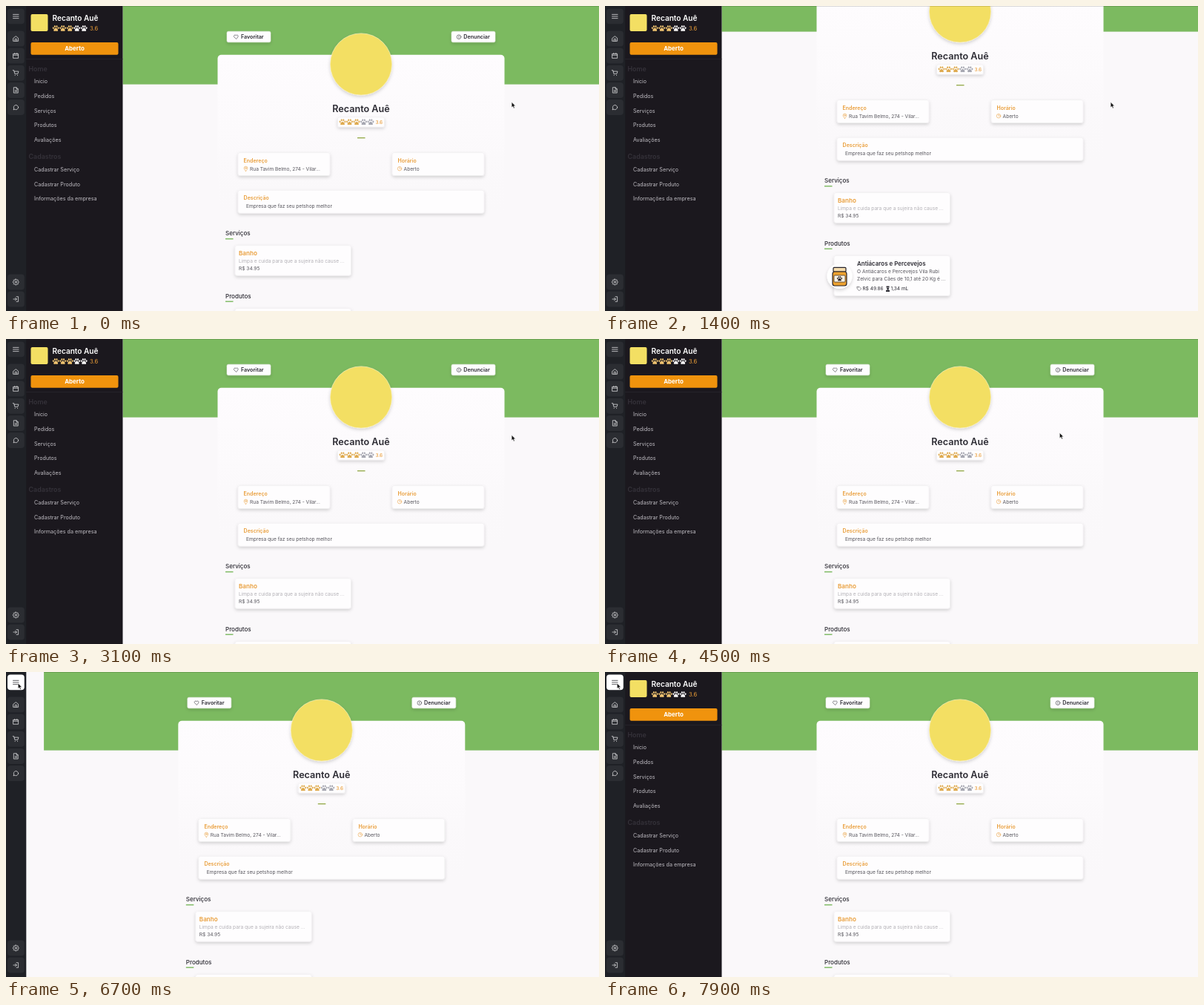
These frames come from a looping animation (800 by 411 pixels, 8 s). An HTML page:

```html
<!DOCTYPE html>
<html lang="pt-BR">
<head>
<meta charset="utf-8">
<title>Painel do petshop</title>
<style>
  html, body { margin: 0; width: 100%; height: 100%; overflow: hidden; background: #faf8fa; }
  svg { display: block; width: 100vw; height: 100vh; font-family: Inter, "Open Sans", sans-serif; }
  .line { fill: none; stroke-width: 2; stroke-linecap: round; stroke-linejoin: round; }
</style>
</head>
<body>
<svg id="stage" viewBox="0 0 800 411" preserveAspectRatio="none">
  <defs>
    <linearGradient id="fade" x1="0" y1="0" x2="0" y2="1">
      <stop offset="0" stop-color="#fefcfe"/>
      <stop offset=".45" stop-color="#fcfafc"/>
      <stop offset="1" stop-color="#faf8fa" stop-opacity="0"/>
    </linearGradient>
    <filter id="shadow" x="-20%" y="-40%" width="140%" height="200%">
      <feDropShadow dx="0" dy="2" stdDeviation="2" flood-color="#000" flood-opacity=".17"/>
    </filter>
    <g id="paw">
      <ellipse cx="-3.4" cy="-.5" rx="1" ry="1.4" transform="rotate(-20 -3.4 -.5)"/>
      <ellipse cx="-1.3" cy="-2.7" rx="1" ry="1.5"/>
      <ellipse cx="1.3" cy="-2.7" rx="1" ry="1.5"/>
      <ellipse cx="3.4" cy="-.5" rx="1" ry="1.4" transform="rotate(20 3.4 -.5)"/>
      <path d="M0-.6C1.4-.6 3.1 1.4 2.9 2.8 2.7 4.2 1 3.5 0 3.5S-2.7 4.2-2.9 2.8C-3.1 1.4-1.4-.6 0-.6Z"/>
    </g>
  </defs>
  <rect width="800" height="411" fill="#faf8fa"/>
  <g id="page">
    <rect id="banner" y="-1" height="106.6" fill="#7cba60"/>
    <g id="content"></g>
  </g>
  <rect id="topline" y="0" height="1" fill="#000" opacity=".14"/>
  <g id="sidebar"></g>
  <g id="rail"></g>
  <path id="cursor" d="M0 0V7.4L1.7 5.9 2.9 8.5 4.2 7.9 3 5.4H5.3Z" fill="#111" stroke="#fff" stroke-width=".6"/>
</svg>
<script>
const LOOP = 8000, STEP = 100;
const OPEN_X = 157.5, CLOSED_X = 27, MAX_SCROLL = 71;
const CLOSE_AT = 6546, REOPEN_AT = 7600, SLIDE = 300, HOVER_AT = 5900;
const SHOP = "Recanto Auê";
const ORANGE = "#e99d38", GREEN = "#7cba60", INK = "#2c2b33", GREY = "#55545b";

const $ = id => document.getElementById(id);

const text = (x, y, str, size, fill, weight = 400, anchor = "start") =>
  `<text x="${x}" y="${y}" font-size="${size}" fill="${fill}" font-weight="${weight}" text-anchor="${anchor}">${str}</text>`;

const rect = (x, y, w, h, fill, r = 0, extra = "") =>
  `<rect x="${x}" y="${y}" width="${w}" height="${h}" rx="${r}" fill="${fill}" ${extra}/>`;

const panel = (x, y, w, h, r = 3) =>
  rect(x, y, w, h, "#fefdfe", r, 'filter="url(#shadow)" stroke="#eceaed" stroke-width=".5"');

// Icons are drawn on a 24-unit grid centred on (cx, cy).
const icon = (cx, cy, size, color, d, id = "") =>
  `<path ${id && `id="${id}"`} class="line" stroke="${color}" d="${d}"
    transform="translate(${cx - size / 2} ${cy - size / 2}) scale(${size / 24})"/>`;

const paws = (x, y, on, off) => [0, 1, 2, 3, 4].map(i =>
  `<use href="#paw" x="${x + i * 9.5}" y="${y}" fill="${i < 3 ? on : off}"/>`).join("");

// Eight teeth: the radius alternates in pairs around the circle.
function gearPath() {
  const points = Array.from({ length: 32 }, (_, i) => {
    const angle = (i - .5) * Math.PI / 16, r = i % 4 < 2 ? 11 : 8.4;
    return `${(12 + r * Math.sin(angle)).toFixed(2)} ${(12 - r * Math.cos(angle)).toFixed(2)}`;
  });
  return `M${points.join("L")}ZM15.2 12A3.2 3.2 0 1 1 8.8 12 3.2 3.2 0 0 1 15.2 12Z`;
}

const ICONS = {
  menu: "M2 5H22M2 12H22M2 19H22",
  home: "M3 10L12 3 21 10V21H3ZM9 21V13H15V21",
  calendar: "M3 5H21V21H3ZM3 10H21M8 2V6M16 2V6",
  cart: "M1 2H5L8 15H19L22 6H6M9 20V21M18 20V21",
  doc: "M5 2H14L20 8V22H5ZM14 2V8H20M9 13H16M9 17H16",
  chat: "M21 11.5A8.5 8.5 0 0 1 8 19L3 21 5 16A8.5 8.5 0 1 1 21 11.5Z",
  gear: gearPath(),
  exit: "M14 3H21V21H14M3 12H15M10 7L15 12 10 17",
  heart: "M12 21L3 12A5.5 5.5 0 0 1 12 5 5.5 5.5 0 0 1 21 12Z",
  alert: "M22 12A10 10 0 1 1 2 12 10 10 0 0 1 22 12ZM12 7V13M12 16V17",
  clock: "M22 12A10 10 0 1 1 2 12 10 10 0 0 1 22 12ZM12 6V12H16",
  pin: "M12 23C7 17 4 14 4 9.5A8 8 0 0 1 20 9.5C20 14 17 17 12 23ZM15 9.5A3 3 0 1 1 9 9.5 3 3 0 0 1 15 9.5Z",
  tag: "M2 2H12L22 12 12 22 2 12ZM7 7V7.1"
};

const heading = (y, label) =>
  text(296, y, label, 8.05, INK, 500) + rect(296, y + 3.9, 10.5, 1.4, GREEN);

const infoCard = (x, y, w, title, body, bodyX) =>
  panel(x, y, w, 31) +
  text(x + 7.6, y + 13, title, 7, ORANGE, 600) +
  text(bodyX, y + 24.2, body, 6.6, GREY);

const pillButton = (x, label, shape, iconX, labelX) =>
  panel(x, 34.2, 59, 14.6, 2) +
  icon(iconX, 41.7, 6.8, INK, ICONS[shape]) +
  text(labelX, 44.3, label, 7.15, INK, 600);

const jar =
  `<g stroke="#26222a" stroke-width="1.2">` +
  rect(308, 423.4, 17, 5.6, "#f4dcae", 1) + rect(307, 429, 19, 19, "#eda22f", 3) +
  rect(309, 434, 15, 9, "#fbf3e2", 1, 'stroke-width=".7"') +
  `</g><use href="#paw" transform="translate(316.5 438.5) scale(.8)" fill="#26222a"/>`;

function buildContent() {
  $("content").innerHTML =
    rect(285.5, 65.8, 387, 224, "url(#fade)", 5) +
    pillButton(298, "Favoritar", "heart", 310.3, 317) +
    pillButton(601, "Denunciar", "alert", 611, 617.3) +
    `<circle cx="479" cy="78.5" r="41.6" fill="#f3df63" stroke="#f8efbb" stroke-width=".7" filter="url(#shadow)"/>` +
    text(479, 143, SHOP, 12.6, INK, 600, "middle") +
    panel(447.5, 150, 63, 13, 2) +
    paws(454, 156.5, "#dfab50", "#a6a7b1") +
    text(498.4, 158.9, "3.6", 6.5, ORANGE, 500) +
    rect(474, 177, 10.5, 1.4, "#98ad50") +
    infoCard(313, 197.6, 124, "Endereço", "Rua Tavim Belmo, 274 - Vilar...", 329) +
    icon(323.5, 219.2, 7, ORANGE, ICONS.pin) +
    infoCard(521, 197.6, 124, "Horário", "Aberto", 536.6) +
    icon(531, 219.2, 6.6, ORANGE, ICONS.clock) +
    infoCard(313, 248.2, 332, "Descrição", "Empresa que faz seu petshop melhor", 324) +
    heading(309.2, "Serviços") +
    panel(309, 322.6, 156.5, 40.6) +
    text(314, 336, "Banho", 8.1, ORANGE, 600) +
    text(314, 346.2, "Limpa e cuida para que a sujeira não cause ...", 6.6, "#b3b1b6") +
    text(314, 356, "R$ 34.95", 6.6, GREY) +
    heading(393.6, "Produtos") +
    panel(309, 407.4, 156.5, 54) +
    `<circle cx="316.5" cy="435" r="17" fill="#fff" filter="url(#shadow)"/>` + jar +
    text(340, 421.2, "Antiácaros e Percevejos", 7.95, INK, 600) +
    text(340, 431.3, "O Antiácaros e Percevejos Vila Rubi", 6.6, GREY) +
    text(340, 441, "Zelvic para Cães de 10,1 até 20 Kg é ...", 6.6, GREY) +
    icon(343, 452, 6.5, INK, ICONS.tag) +
    text(347.6, 454.4, "R$ 49.86", 6.5, INK) +
    rect(379.5, 448.5, 4, 2, INK) + rect(380.3, 451, 2.6, 2.6, INK) + rect(379, 454, 5, 2, INK) +
    text(385.5, 454.4, "1,34 mL", 6.5, INK);
}

function buildSidebar() {
  const group = (y, label, items) =>
    text(30.5, y, label, 8.9, "#35323a", 600) +
    items.map((item, i) => text(38, y + 16.4 + i * 19.8, item, 7.2, "#c0bec4")).join("");
  $("sidebar").innerHTML =
    rect(27, 0, OPEN_X - 27, 411, "#1b181e") +
    rect(33.5, 11, 23, 23, "#f3df63", 2) +
    text(62.5, 19.6, SHOP, 10.1, "#fff", 600) +
    paws(67.2, 30.2, "#edc16f", "#f5f3f4") +
    text(113, 32.9, "3.6", 7.6, ORANGE) +
    rect(33.5, 48.9, 118, 16.9, "#f0930d", 2) +
    text(92.5, 60.2, "Aberto", 7.9, "#fff", 700, "middle") +
    rect(27, 71, OPEN_X - 27, .8, "#29262d") +
    group(87.6, "Home", ["Inicio", "Pedidos", "Serviços", "Produtos", "Avaliações"]) +
    group(206.4, "Cadastros", ["Cadastrar Serviço", "Cadastrar Produto", "Informações da empresa"]);
}

function buildRail() {
  const buttons = { home: 44, calendar: 67, cart: 90.3, doc: 113.4, chat: 136.6, gear: 372, exit: 395 };
  $("rail").innerHTML =
    rect(0, 0, 27.3, 411, "#1f2126") +
    rect(2, 3.5, 22.8, 20.8, "#2b2d32", 4, 'id="menuBox"') +
    icon(13.3, 14, 9, "#e6e6e8", ICONS.menu, "menuIcon") +
    Object.entries(buttons).map(([name, y]) =>
      rect(2, y - 10.5, 22.8, 21, "#2b2d32", 4) +
      icon(13.3, y, 8.8, "#e6e6e8", ICONS[name])).join("");
}

const clamp = v => Math.max(0, Math.min(1, v));
const progress = (t, start, length) => clamp((t - start) / length);
const easeOut = p => Math.sin(p * Math.PI / 2);

// Same curve as the CSS keyword "ease".
function ease(p) {
  const bezier = (u, a, b) => 3 * u * (1 - u) ** 2 * a + 3 * u * u * (1 - u) * b + u ** 3;
  let lo = 0, hi = 1;
  for (let i = 0; i < 24; i++) {
    const mid = (lo + hi) / 2;
    if (bezier(mid, .25, .25) < p) lo = mid; else hi = mid;
  }
  return bezier(lo, .1, 1);
}

const PATH = [
  [4000, 682.1, 129.4], [4300, 668, 129], [4500, 613.3, 126.4], [4700, 440, 106],
  [4900, 259, 80], [5300, 90, 45], [5800, 25.5, 21], [6100, 16.2, 15]
];

function cursorAt(t) {
  const next = PATH.findIndex(p => p[0] > t);
  if (next === 0) return PATH[0].slice(1);
  if (next < 0) return PATH[PATH.length - 1].slice(1);
  const a = PATH[next - 1], b = PATH[next];
  const k = (t - a[0]) / (b[0] - a[0]);
  return [a[1] + (b[1] - a[1]) * k, a[2] + (b[2] - a[2]) * k];
}

function render(t) {
  const down = easeOut(progress(t, 950, 450));
  const up = easeOut(progress(t, 2250, 755));
  const scroll = MAX_SCROLL * (down - up);
  const closed = ease(progress(t, CLOSE_AT, SLIDE)) - ease(progress(t, REOPEN_AT, SLIDE));
  const left = OPEN_X + (CLOSED_X - OPEN_X) * closed;

  $("page").setAttribute("transform", `translate(0 ${-scroll})`);
  $("content").setAttribute("transform", `translate(${(left - OPEN_X) / 2} 0)`);
  for (const id of ["banner", "topline"]) {
    $(id).setAttribute("x", left);
    $(id).setAttribute("width", 800 - left);
  }
  $("sidebar").style.display = t > CLOSE_AT && t <= REOPEN_AT ? "none" : "";

  const hover = t >= HOVER_AT;
  $("menuBox").setAttribute("fill", hover ? "#fff" : "#2b2d32");
  $("menuIcon").setAttribute("stroke", hover ? "#2b2d32" : "#e6e6e8");
  $("cursor").setAttribute("transform", `translate(${cursorAt(t)})`);
}

buildContent();
buildSidebar();
buildRail();

const start = performance.now();
function tick() {
  const t = (performance.now() - start) % LOOP;
  render(Math.floor(t / STEP) * STEP);
  requestAnimationFrame(tick);
}
tick();
</script>
</body>
</html>
```
